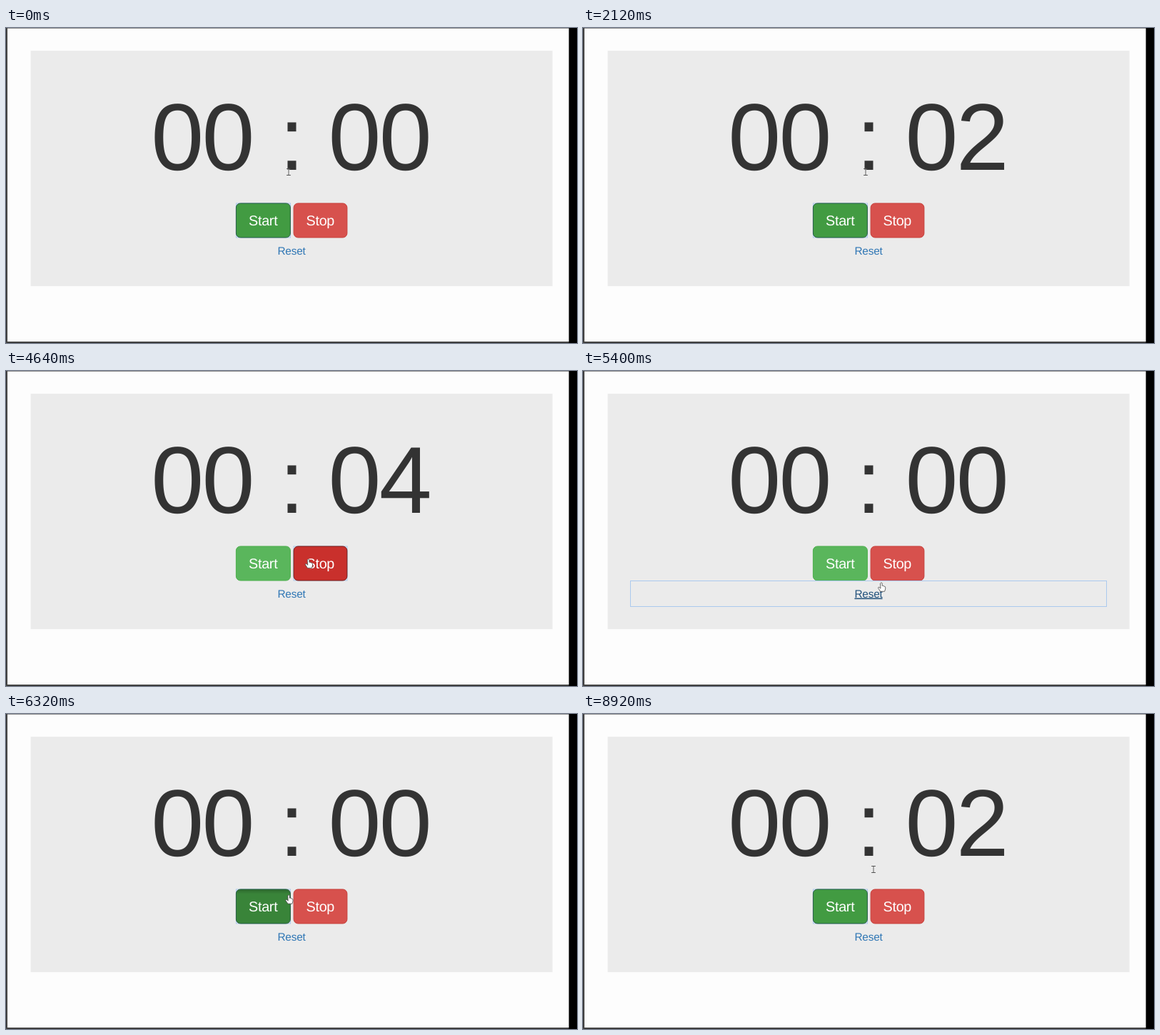
Write an HTML page that moves like this. It is 800x442 px and loops after 8.96 s.

```html
<!DOCTYPE html>
<html lang="en">
<head>
<meta charset="utf-8">
<title>Stopwatch</title>
<style>
  html, body { margin: 0; width: 100%; height: 100%; overflow: hidden; background: #fdfdfd; }
  svg { display: block; width: 800px; height: 442px; }
  text {
    font-family: "Liberation Sans", Arial, sans-serif;
    text-anchor: middle; text-rendering: geometricPrecision;
  }
  #clock { fill: #333; font-size: 133px; }
  #clock .colon { font-size: 126px; }
  #clock .one { font-family: "Open Sans", "Noto Sans", sans-serif; font-size: 128px; transform: translateX(7px); }
  .label { font-size: 19.8px; letter-spacing: -.015em; fill: #fff; }
  #reset { font-size: 15.4px; letter-spacing: -.015em; }
  .ring { fill: none; stroke: #abc9ee; }
  .cursor { stroke-linejoin: round; stroke-linecap: round; }
</style>
</head>
<body>
<svg viewBox="0 0 800 442">
  <defs>
    <linearGradient id="press" x2="0" y2="1">
      <stop offset="0" stop-opacity=".2"/>
      <stop offset=".13" stop-opacity="0"/>
    </linearGradient>
  </defs>
  <rect width="800" height="442" fill="#fdfdfd"/>
  <rect width="789" height="1" fill="#959595"/>
  <rect width="2" height="442" fill="#404040"/>
  <rect y="440" width="789" height="2" fill="#404040"/>
  <rect x="788.6" width="12" height="442" fill="#000"/>
  <rect x="34.6" y="31.8" width="731" height="330.4" fill="#ebebeb"/>

  <g id="clock">
    <text x="240.2" y="199">0</text>
    <text x="311.4" y="199">0</text>
    <text x="400.4" y="199" class="colon">:</text>
    <text x="488.5" y="199">0</text>
    <text x="559.7" y="199" id="digit">0</text>
  </g>

  <rect id="startRing" class="ring" x="322.5" y="246" width="76" height="48"/>
  <rect id="start" x="322.4" y="246" width="76" height="48" rx="6"/>
  <rect id="startPress" x="323" y="246.5" width="75" height="47" rx="5.5" fill="url(#press)"/>
  <text class="label" x="360.2" y="277">Start</text>

  <rect id="stopRing" class="ring" x="403" y="246" width="75" height="48"/>
  <rect id="stop" x="403.1" y="246" width="74.8" height="48" rx="6"/>
  <rect id="stopPress" x="403.6" y="246.5" width="73.8" height="47" rx="5.5" fill="url(#press)"/>
  <text class="label" x="440.3" y="277">Stop</text>

  <rect id="resetRing" class="ring" x="66.5" y="294.5" width="667" height="36"/>
  <text id="reset" x="400" y="317.6">Reset</text>

  <g id="beam" class="cursor" fill="none">
    <path d="M0-4V4" stroke="#fff" stroke-width="2.4" opacity=".6"/>
    <path d="M-2.5-4.5H2.5M0-4.5V4.5M-2.5 4.5H2.5" stroke="#444" stroke-width=".9"/>
  </g>
  <path id="hand" class="cursor" fill="#fff" stroke="#444" stroke-width=".8"
    d="M-1.2 .8Q0-1 1.2 .8V4.4Q2.5 3.7 3 4.9Q4.2 4.4 4.5 5.6Q5.8 5.3 5.8 6.8V9L4.7 12.4H-1.2L-4.3 7.8Q-4.5 6.2-3 6.5L-1.2 8Z"/>
  <path id="arrow" class="cursor" fill="#222" stroke="#fff" stroke-width=".8"
    d="M0 0V11L2.6 8.6L4.2 12.2L6 11.4L4.4 7.9H7.8Z"/>
</svg>
<script>
const LOOP = 8960, TICK = 40, SECOND = 1000, TRAVEL = 360;
const STOPPED = 4400, RESET = 5000, RESTARTED = 6400;
const HEAD_START = 280; // already running when the loop begins
const $ = id => document.getElementById(id);

// Each move eases the pointer to its next resting place
const home = { x: 396, y: 202 };
const moves = [
  { at: 3800, x: 424, y: 262 },
  { at: 4560, x: 417, y: 308 },
  { at: 5280, x: 423, y: 233 },
  { at: 6000, x: 396, y: 254 },
  { at: 6400, x: 407, y: 218 }
];

const clamp = u => Math.min(1, Math.max(0, u));
const ease = u => u < .5 ? 4 * u ** 3 : 1 - 4 * (1 - u) ** 3;
const within = (t, a, b) => t >= a && t < b;
const inside = (p, x0, y0, x1, y1) => within(p.x, x0, x1) && within(p.y, y0, y1);
const show = (id, on) => { $(id).style.display = on ? "" : "none"; };

function pointer(t) {
  return moves.reduce((p, m) => {
    const u = ease(clamp((t - m.at) / TRAVEL));
    return { x: p.x + (m.x - p.x) * u, y: p.y + (m.y - p.y) * u };
  }, home);
}

function seconds(t) {
  const elapsed = t < RESET ? Math.min(t, STOPPED) + HEAD_START : Math.max(0, t - RESTARTED);
  return Math.floor(elapsed / SECOND);
}

// Colours are [fill, border] pairs
const green = {
  rest: ["#5ab65c", "#4cae4c"], hover: ["#449d44", "#398439"],
  focus: ["#429b42", "#255c48"], active: ["#398439", "#255c40"]
};
const red = {
  rest: ["#d7514d", "#c63e3a"], hover: ["#c9302c", "#ac2925"],
  focus: ["#c9302c", "#761c19"], active: ["#ac2925", "#761c19"]
};

function paintButton(id, look, hover, focus, active) {
  const [fill, border] = look[active ? "active" : focus ? "focus" : hover ? "hover" : "rest"];
  $(id).setAttribute("fill", fill);
  $(id).setAttribute("stroke", border);
  show(id + "Ring", focus);
  show(id + "Press", active);
}

function render(t) {
  const p = pointer(t);
  const onStart = inside(p, 322, 246, 399, 294.5);
  const onStop = inside(p, 403, 246, 479, 294.5);
  const onReset = inside(p, 66, 294.5, 735, 331);

  // Focus moves when the mouse goes down, a little before each click lands
  const press = 120;
  const stopFocus = within(t, STOPPED, RESET - press);
  const resetFocus = within(t, RESET - press, RESTARTED - press);

  const n = seconds(t);
  $("digit").textContent = n;
  $("digit").classList.toggle("one", n === 1);

  paintButton("start", green, onStart, !stopFocus && !resetFocus, within(t, RESTARTED - press, RESTARTED));
  paintButton("stop", red, onStop, stopFocus, within(t, STOPPED, STOPPED + press));

  const lit = onReset || resetFocus;
  $("reset").setAttribute("fill", lit ? "#23527c" : "#3077b5");
  $("reset").setAttribute("text-decoration", lit ? "underline" : "none");
  show("resetRing", resetFocus);

  const kind = onStart || onStop || onReset ? "hand" : p.y < 226 ? "beam" : "arrow";
  for (const id of ["beam", "hand", "arrow"]) show(id, id === kind);
  $(kind).setAttribute("transform", `translate(${p.x} ${p.y})`);
}

const begin = performance.now();
function frame() {
  const t = (performance.now() - begin) % LOOP;
  render(Math.floor(t / TICK) * TICK);
  requestAnimationFrame(frame);
}
frame();
</script>
</body>
</html>
```
